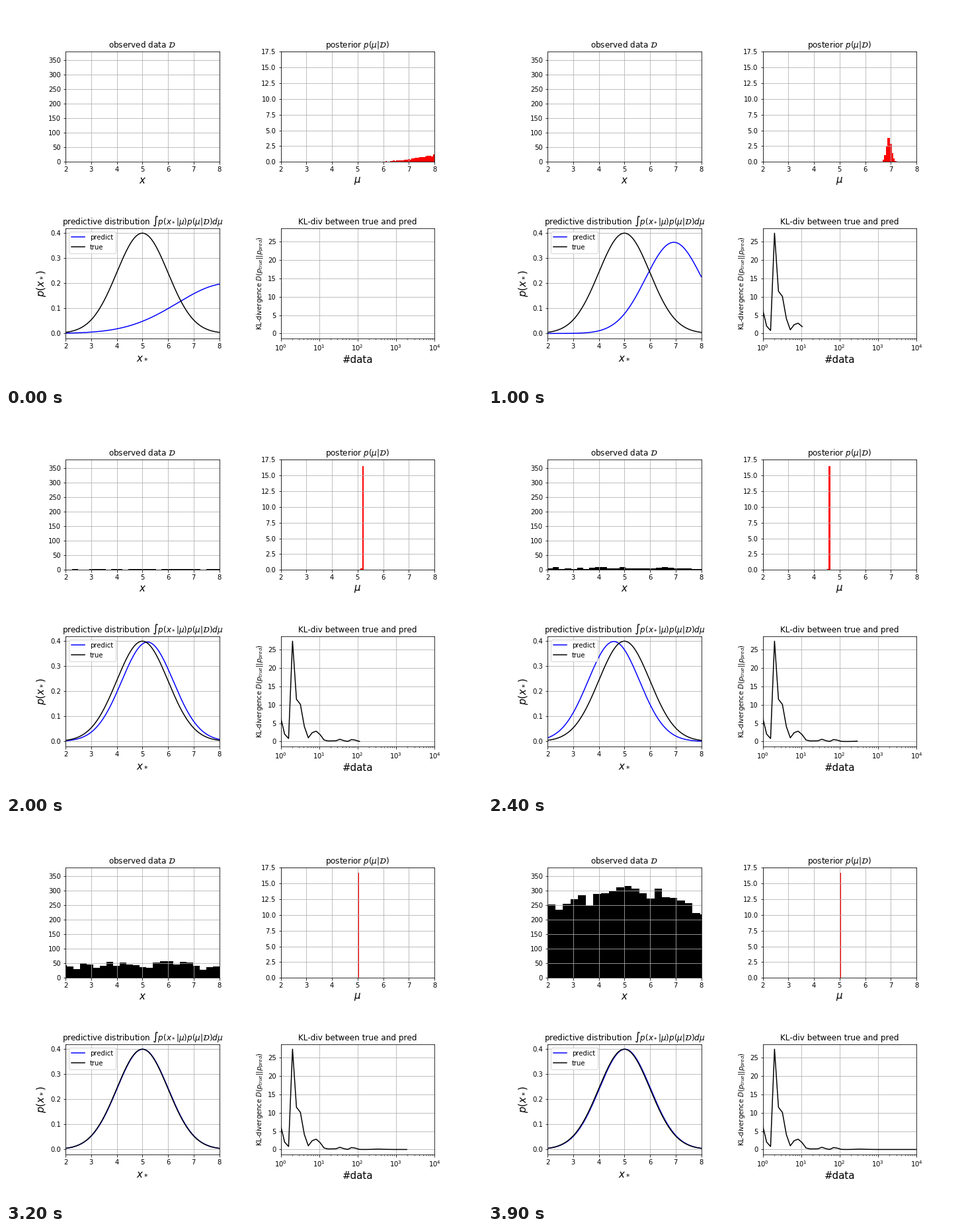
Recreate the animation shown at these times as a matplotlib script. Size 720 by 576 pixels, loop 4 s.

```python
import numpy as np
import matplotlib.pyplot as plt
from matplotlib.animation import FuncAnimation

plt.rcParams["text.kerning_factor"] = 6

STEPS = 40
TRUE_MEAN, DATA_SD = 5.0, 4.0
LOW, HIGH, BINS = 2, 8, 100

# Key points of the estimate's error: (step, offset from the true mean)
ERROR_KEYS = [
    (0, 3.37), (1, 1.55), (2, 0.1), (3, 7.36), (4, 4.75), (5, 4.47),
    (6, 2.84), (7, 1.39), (8, 2.18), (9, 2.36), (10, 1.93), (11, 0.89),
    (12, -0.55), (14, -0.6), (15, -1.09), (16, -0.694), (18, 1.03),
    (19, -0.83), (20, 0.2), (24, -0.412), (25, 0.45), (29, 0.035),
    (35, -0.01), (39, 0.025)]

kl_x = np.logspace(0, 4, STEPS)
sizes = kl_x.astype(int)
errors = np.interp(np.arange(STEPS), *zip(*ERROR_KEYS))
means = TRUE_MEAN + errors
pred_sd = 1 + 1 / sizes
kl_div = (errors ** 2 + pred_sd ** 2 - 1) / 2 - np.log(pred_sd)


def normal_pdf(x, mean, sd):
    return np.exp(-((x - mean) / sd) ** 2 / 2) / (sd * np.sqrt(2 * np.pi))


def observed(step):
    """Histogram of the data seen so far, centred on the estimate."""
    data = np.random.default_rng(step).normal(0, DATA_SD, sizes[step])
    data += means[step] - data.mean()
    return np.histogram(data, BINS)


def posterior(step):
    """Sampled posterior density on the visible range."""
    rng = np.random.default_rng(100 + step)
    samples = rng.normal(means[step], 1 / sizes[step], 10000)
    counts, edges = np.histogram(samples, BINS, (LOW, HIGH))
    total = counts.sum()
    # A few stray samples say nothing about the density
    scale = total * (edges[1] - edges[0]) if total > 20 else np.inf
    return counts / scale, edges


def set_bars(bars, heights, edges):
    width = edges[1] - edges[0]
    for bar, left, height in zip(bars, edges, heights):
        bar.set(x=left, width=width, height=height)


def style(ax, title, xlabel, ylim, yticks):
    ax.set_title(title, fontsize=12)
    ax.set_xlabel(xlabel, fontsize=15)
    ax.set_yticks(yticks)
    ax.set_ylim(*ylim)
    ax.grid(True)
    if ax is not ax_kl:
        ax.set_xticks(range(LOW, HIGH + 1))
        ax.set_xlim(LOW, HIGH)


fig, axes = plt.subplots(2, 2, figsize=(10, 8), dpi=72)
fig.subplots_adjust(left=0.125, right=0.9, bottom=0.125, top=0.88,
                    wspace=0.4, hspace=0.6)
ax_data, ax_post, ax_pred, ax_kl = axes.flat

data_bars = ax_data.bar(range(BINS), 0, align="edge", color="k")
post_bars = ax_post.bar(range(BINS), 0, align="edge", color="r")

xs = np.linspace(LOW, HIGH, 200)
pred_line, = ax_pred.plot(xs, 0 * xs, "b", label="predict")
ax_pred.plot(xs, normal_pdf(xs, TRUE_MEAN, 1), "k", label="true")
ax_pred.legend(loc="upper left")

ax_kl.set_xscale("log")
ax_kl.set_xlim(1, 1e4)
kl_line, = ax_kl.plot([], [], "k")

style(ax_data, r"observed data $\mathcal{D}$", "$x$",
      (0, 379), range(0, 351, 50))
style(ax_post, r"posterior $p(\mu|\mathcal{D})$", r"$\mu$",
      (0, 17.5), np.arange(0, 17.6, 2.5))
style(ax_pred,
      r"predictive distribution $\int p(x_*|\mu)p(\mu|\mathcal{D})d\mu$",
      "$x_*$", (-0.02, 0.4189), np.arange(5) / 10)
style(ax_kl, "KL-div between true and pred", "#data",
      (-1.365, 28.66), range(0, 26, 5))
ax_pred.set_ylabel("$p(x_*)$", fontsize=15)
ax_kl.set_ylabel(r"KL-divergence $D(p_{true}||p_{pred})$", fontsize=10)


def update(step):
    set_bars(data_bars, *observed(step))
    set_bars(post_bars, *posterior(step))
    pred_line.set_ydata(normal_pdf(xs, means[step], pred_sd[step]))
    kl_line.set_data(kl_x[:step + 1], kl_div[:step + 1])
    return [*data_bars, *post_bars, pred_line, kl_line]


anim = FuncAnimation(fig, update, frames=STEPS, interval=100,
                     repeat=True, repeat_delay=0, blit=False)
plt.show()
```
